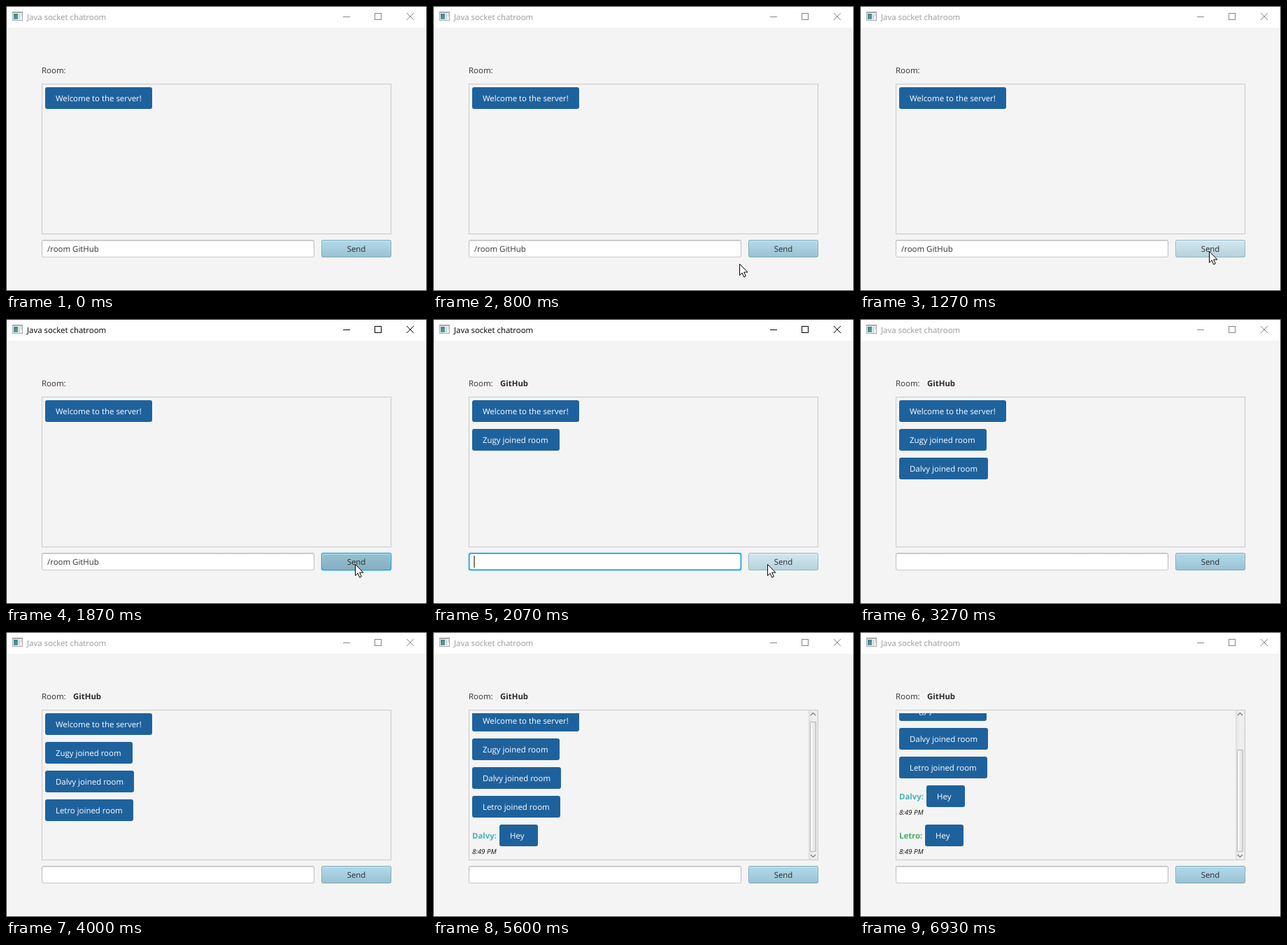
These frames come from a looping animation (602x407 px, 8000 ms). An HTML page with a canvas:

```html
<!DOCTYPE html>
<html lang="en">
<head>
<meta charset="utf-8">
<title>Java socket chatroom</title>
<style>
  html, body { margin: 0; width: 100%; height: 100%; overflow: hidden; background: #f4f4f4; }
  canvas { display: block; width: 602px; height: 407px; }
</style>
</head>
<body>
<canvas id="stage" width="602" height="407"></canvas>
<script>
const ctx = document.getElementById('stage').getContext('2d');
const LOOP = 8000;
const FAMILY = '"Open Sans", "Noto Sans", sans-serif';
const REGULAR = `11.45px ${FAMILY}`;
const BOLD = `bold 11.4px ${FAMILY}`;
const SMALL = `italic 9.7px ${FAMILY}`;
const BLUE = '#1e629d';

// Chat log: time of arrival, row position and content.
const log = [
  { at: 0, y: 116, w: 153, text: 'Welcome to the server!' },
  { at: 2000, y: 157, w: 125, text: 'Zugy joined room' },
  { at: 3270, y: 198, w: 127, text: 'Dalvy joined room' },
  { at: 4000, y: 239, w: 126, text: 'Letro joined room' },
  { at: 5600, y: 280, w: 55, text: 'Hey', from: 'Dalvy:', color: '#45b4b4', indent: 39 },
  { at: 6930, y: 336, w: 55, text: 'Hey', from: 'Letro:', color: '#42b068', indent: 37 }
];

const within = (t, a, b) => t >= a && t < b;

function rect(x, y, w, h, fill) {
  ctx.fillStyle = fill;
  ctx.fillRect(x, y, w, h);
}

function round(x, y, w, h, r, fill) {
  ctx.beginPath();
  ctx.roundRect(x, y, w, h, r);
  ctx.fillStyle = fill;
  ctx.fill();
}

function frame(x, y, w, h, color) {
  ctx.strokeStyle = color;
  ctx.lineWidth = 1;
  ctx.strokeRect(x + .5, y + .5, w - 1, h - 1);
}

function line(points, color, width = 1) {
  ctx.beginPath();
  points.forEach(([x, y]) => ctx.lineTo(x, y));
  ctx.strokeStyle = color;
  ctx.lineWidth = width;
  ctx.stroke();
}

function text(str, x, y, color, font = REGULAR, align = 'left') {
  ctx.font = font;
  ctx.textAlign = align;
  ctx.fillStyle = color;
  ctx.fillText(str, x, y);
}

function gradient(x0, y0, x1, y1, ...colors) {
  const g = ctx.createLinearGradient(x0, y0, x1, y1);
  colors.forEach((c, i) => g.addColorStop(i / (colors.length - 1), c));
  return g;
}

function pointerAt(t) {
  if (within(t, 330, 400)) return [98, 397];
  if (within(t, 600, 2000)) {
    const p = Math.min(10, Math.floor((t - 600) / 67)) / 10;
    const e = 1 - (1 - p) ** 2, q = 1 - e;
    return [
      Math.round(q * q * 367 + 2 * q * e * 440 + e * e * 499),
      Math.round(q * q * 398 + 2 * q * e * 362 + e * e * 350)
    ];
  }
  if (within(t, 2000, 2070)) return [493, 350];
  if (within(t, 2070, 2130)) return [478, 350];
  if (within(t, 2130, 2200)) return [454, 354];
  return null;
}

function drawWindow(active) {
  rect(0, 0, 602, 407, '#f4f4f4');
  rect(0, 0, 602, 31, '#fff');
  frame(0, 0, 602, 407, active ? '#262626' : '#414141');

  rect(9, 8, 15, 13, '#a5a9ac');
  rect(10, 10, 13, 10, '#f3f3f3');
  rect(11, 11, 6, 8, gradient(11, 11, 17, 19, '#3f7f8c', '#5aa09a'));
  rect(18, 11, 2, 8, '#cfd3d4');
  rect(21, 11, 2, 4, '#d9dcdd');

  text('Java socket chatroom', 30, 20, active ? '#000' : '#999');
  const ink = active ? '#000' : '#858585';
  rect(482, 15, 10, 1, ink);
  frame(527, 10, 10, 10, ink);
  line([[573, 10], [583, 20]], ink);
  line([[583, 10], [573, 20]], ink);
}

function drawMessage(m, y) {
  let x = 56;
  if (m.from) {
    text(m.from, x, y + 20, m.color, BOLD);
    text('8:49 PM', x, y + 42, '#111', SMALL);
    x += m.indent;
  }
  round(x, y, m.w, 31, 3, BLUE);
  text(m.text, x + 15, y + 20, '#fff');
}

function drawScrollBar(top) {
  rect(537, 112, 13, 213, gradient(537, 0, 550, 0, '#e2e2e2', '#f0f0f0', '#ececec'));
  rect(537, 112, 1, 213, '#dcdcdc');
  line([[540, 119], [543.5, 115.5], [547, 119]], '#777', 1.2);
  line([[540, 318], [543.5, 321.5], [547, 318]], '#777', 1.2);
  round(539, top, 9, 314 - top, 2, '#b4b4b4');
  round(540, top + 1, 7, 312 - top, 1.5, gradient(540, 0, 547, 0, '#fdfdfd', '#ececec', '#dedede'));
}

function drawChat(t) {
  frame(51, 111, 500, 215, '#c8c8c8');
  const scroll = t >= 6930 ? 61 : t >= 5600 ? 5 : 0;
  ctx.save();
  ctx.beginPath();
  ctx.rect(56, 116, 480, 205);
  ctx.clip();
  log.filter(m => t >= m.at).forEach(m => drawMessage(m, m.y - scroll));
  ctx.restore();
  if (scroll) drawScrollBar(scroll > 5 ? 168 : 128);
}

function drawField(t, focused) {
  if (focused) {
    round(49.6, 332.6, 392.8, 27.8, 4, 'rgba(3,158,211,.14)');
    round(51, 334, 390, 25, 3, '#039ed3');
    round(52.4, 335.4, 387.2, 22.2, 2, '#fff');
  } else {
    round(51, 334, 390, 25, 3, gradient(0, 334, 0, 359, '#b2b2b2', '#c8c8c8'));
    round(52, 335, 388, 23, 2, '#fff');
    rect(53, 335, 386, 1, '#eaeaea');
    rect(53, 336, 386, 1, '#f7f7f7');
  }
  if (t < 2000) text('/room GitHub', 59, 351, '#323232');
  if (focused && !within(t, 2470, 3000)) rect(58, 338, 2, 17, '#7f7f7f');
}

function drawButton(hover, armed) {
  if (armed) round(449.6, 332.6, 102.8, 27.8, 4, 'rgba(3,158,211,.14)');
  round(451, 334, 100, 25, 3, armed ? '#039ed3' : hover ? '#8db3c1' : '#78a8bb');
  const body = armed ? ['#94c0d2', '#86b0c2']
    : hover ? ['#d0e7ef', '#b7d3dd']
    : ['#b0d9ea', '#9bc3d4'];
  round(452, 335, 98, 23, 2, gradient(0, 335, 0, 358, hover && !armed ? '#e8f5fa' : '#cae8f4', body[1]));
  round(453, 336, 96, 21, 1.5, gradient(0, 336, 0, 357, ...body));
  text('Send', 501, 351, '#2b2b2b', REGULAR, 'center');
}

function drawPointer([x, y]) {
  const shape = [[0, 0], [0, 16], [3.6, 12.6], [6.2, 18.6], [8.8, 17.4], [6.2, 11.6], [11.4, 11.6]];
  ctx.beginPath();
  shape.forEach(([dx, dy]) => ctx.lineTo(x + .5 + dx, y + .5 + dy));
  ctx.closePath();
  ctx.fillStyle = '#fff';
  ctx.fill();
  ctx.strokeStyle = '#000';
  ctx.lineWidth = 1;
  ctx.stroke();
}

function draw(t) {
  const pointer = pointerAt(t);
  const hover = !!pointer && pointer[0] >= 451 && pointer[1] < 359;
  drawWindow(within(t, 1870, 3200));
  text('Room:', 51, 96, '#323232');
  if (t >= 2000) text('GitHub', 96, 96, '#2b2b2b', BOLD);
  drawChat(t);
  drawField(t, within(t, 2000, 3200));
  drawButton(hover, within(t, 1870, 2000));
  if (pointer) drawPointer(pointer);
}

ctx.textRendering = 'geometricPrecision';
const start = performance.now();
function tick() {
  draw((performance.now() - start) % LOOP);
  requestAnimationFrame(tick);
}
tick();
</script>
</body>
</html>
```
